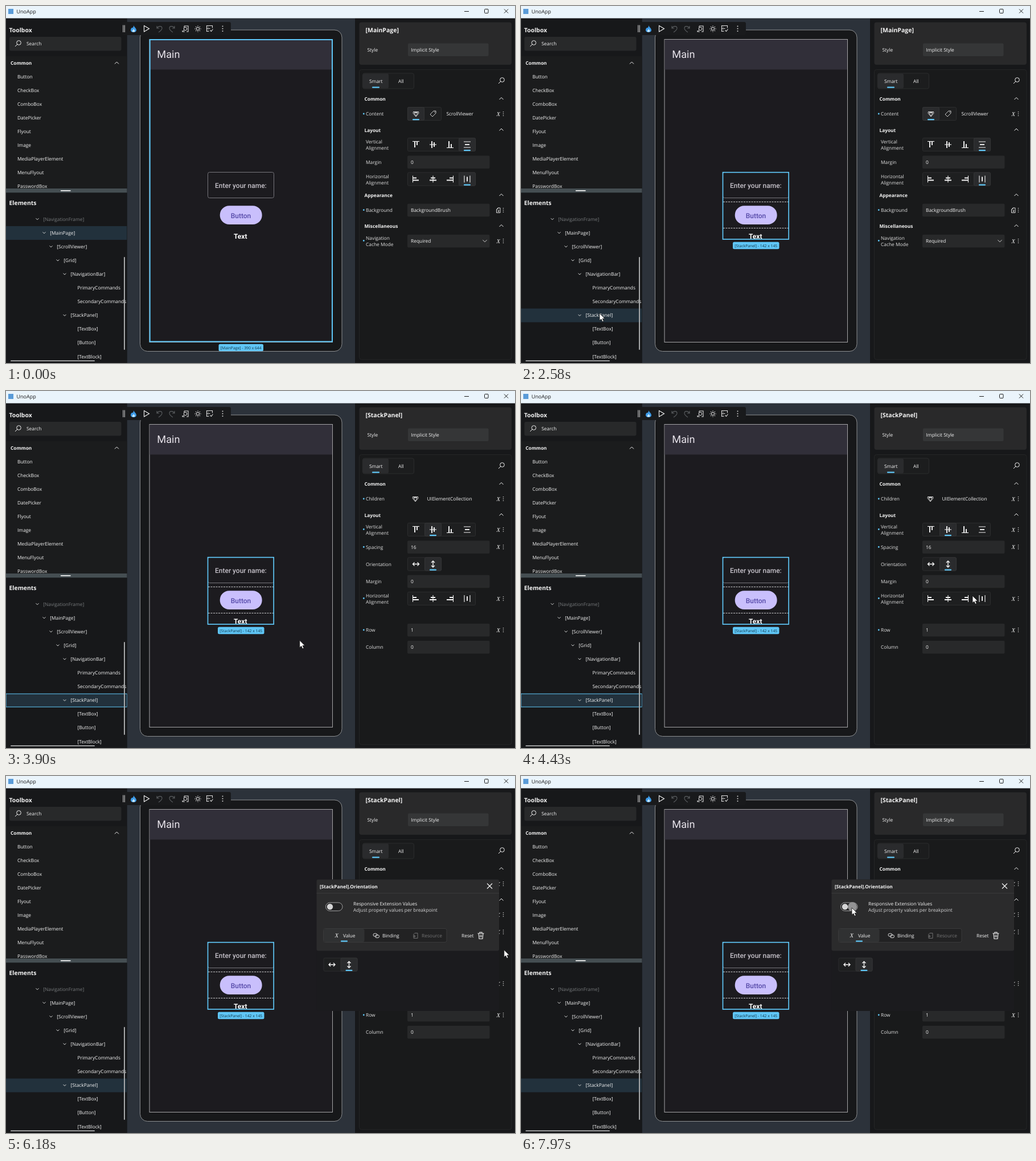
An HTML page that plays this animation: 894 px wide and 626 px high, repeating every 7.99 s.

```html
<!DOCTYPE html>
<html lang="en">
<head>
<meta charset="utf-8">
<title>UnoApp</title>
<style>
  html, body { margin: 0; width: 100%; height: 100%; overflow: hidden; background: #17181a; }
  svg { display: block; width: 894px; height: 626px; }
  text { font-family: "Open Sans", "Noto Sans", sans-serif; white-space: pre; }
  .app { font-family: Roboto, sans-serif; }
  .var { font-family: "Liberation Serif", serif; font-style: italic; }
</style>
</head>
<body>
<svg id="stage" viewBox="0 0 894 626" text-rendering="geometricPrecision"></svg>
<script>
const LOOP = 7990;
const BLUE = '#5fc6f6', INK = '#f4f4f4', FIELD = '#28292a';

// Drawing helpers, each returning markup
const rect = (x, y, w, h, fill, extra = '') =>
  `<rect x="${x}" y="${y}" width="${w}" height="${h}" fill="${fill}" ${extra}/>`;
const line = (d, color = INK, width = 1, extra = '') =>
  `<path d="${d}" fill="none" stroke="${color}" stroke-width="${width}" ${extra}/>`;
const text = (x, y, s, size = 8.4, fill = INK, extra = '') =>
  `<text x="${x}" y="${y}" font-size="${size}" fill="${fill}" ${extra}>${s}</text>`;
const bold = (x, y, s, size = 8.3) => text(x, y, s, size, INK, 'font-weight="700"');
const at = (x, y, body, extra = '') => `<g transform="translate(${x} ${y}) ${extra}">${body}</g>`;
const group = (id, body) => `<g id="${id}">${body}</g>`;
const circle = (x, y, r, fill, extra = '') =>
  `<circle cx="${x}" cy="${y}" r="${r}" fill="${fill}" ${extra}/>`;

const up = (x, y) => line(`M${x - 3.5} ${y + 2}l3.5 -3.5 3.5 3.5`);
const down = (x, y, s = 2.5) => line(`M${x - s} ${y - s / 2}l${s} ${s} ${s} ${-s}`, '#d8d8d8');
const dots = (x, y, gap = 3.3, r = .8) =>
  [-gap, 0, gap].map(d => circle(x, y + d, r, '#d4d4d4')).join('');
const loupe = (x, y) => line(`M${x - 5} ${y + 5}l4 -4`) +
  circle(x + 1.5, y - 1.5, 3.8, 'none', `stroke="${INK}"`);
const variable = (x, y) => text(x, y, 'X', 10.5, INK, 'class="var"');

// Property panel parts
const ALIGN = [
  ['M-6 -5.5H6', 'M-2 -5.5V5M2 -5.5V1'],
  ['M-6 0H6', 'M-2 -6V6M2 -4V4'],
  ['M-6 5.5H6', 'M-2 5.5V-6M2 5.5V-1'],
  ['M-6 -5H6M-6 5H6', 'M-4 0H4']
];
const alignIcon = i => line(ALIGN[i][0], INK, 1.1) + line(ALIGN[i][1], INK, 1.9);
const arrows = line('M-5 0H5M-2.5 -3L-5.5 0L-2.5 3M2.5 -3L5.5 0L2.5 3', INK, 1.4);
const gem = line('M-4.5 -3.5H4.5L5 -1L0 5L-5 -1ZM-3 -1L0 -4L3 -1L0 4ZM-4.5 -3.5L3 -1M4.5 -3.5L-3 -1', '#dcdcdc', .9);
const tag = line('M-5 1L1 -5H5V-1L-1 5Z', '#c8c8c8') + circle(3, -3, .8, '#c8c8c8');

function cells(x, cy, icons, selected) {
  const w = 30 * icons.length;
  let out = rect(x + .5, cy - 11.5, w - 1, 23, '#1e1f20', 'rx="2" stroke="#2c2d2e"');
  if (selected >= 0) {
    const sx = x + 30 * selected;
    out += rect(sx + .5, cy - 11.5, 29, 23, '#2a2b2d', 'rx="2" stroke="#343536"') +
      rect(sx + 9, cy + 9, 12, 2.2, BLUE, 'rx="1"');
  }
  return out + icons.map((icon, i) => at(x + 15 + 30 * i, cy, icon)).join('');
}
const verticalCells = (cy, sel) => cells(705, cy, [0, 1, 2, 3].map(alignIcon), sel);
const horizontalCells = (cy, sel) =>
  cells(705, cy, [0, 1, 2, 3].map(i => at(0, 0, alignIcon(i), 'rotate(-90)')), sel);
const orientationCells = (x, cy) => cells(x, cy, [arrows, at(0, 0, arrows, 'rotate(90)')], 1);

const field = (cy, s) => rect(705, cy - 11, 144.5, 22.5, FIELD, 'rx="2"') + text(711, cy + 3, s);
const section = (cy, s) => bold(629.5, cy + 3, s) + up(870, cy - 1);
function label(cy, s, custom) {
  const rows = s.split('|');
  const first = rows.length > 1 ? cy - 2 : cy + 3;
  return rows.map((r, i) => text(632, first + 11 * i, r, 8.4, '#e2e2e2')).join('') +
    (custom ? circle(628.3, rows.length > 1 ? cy - 0.5 : cy, 1.4, BLUE) : '');
}
const menu = cy => variable(861.5, cy + 3.5) + dots(873.5, cy);

const titleBar = () => rect(0, 0, 894, 21.5, '#eaf4fb') +
  rect(4, 5, 9, 9, '#5a9bd8') +
  group('caption', text(18.5, 13, 'UnoApp', 9, '#1b1b1b') +
    line('M805 9.5H813M875 5.5L882 12.5M882 5.5L875 12.5', '#1b1b1b') +
    rect(840.5, 5.5, 6.5, 7, 'none', 'stroke="#1b1b1b" rx="1"'));

function toolbox() {
  const items = ['Button', 'CheckBox', 'ComboBox', 'DatePicker', 'Flyout', 'Image',
    'MediaPlayerElement', 'MenuFlyout', 'PasswordBox'];
  return rect(0, 21.5, 212.5, 605, '#17181a') + rect(0, 88, 212.5, 232, '#1b1c1d') +
    bold(5.5, 46, 'Toolbox', 10.4) + rect(6, 54, 196.5, 24.5, '#28292a', 'rx="3"') +
    loupe(21, 66) + text(36, 69, 'Search') +
    bold(8, 102.5, 'Common') + up(194.5, 99.5) +
    items.map((s, i) => text(20, 126.5 + 24.1 * i, s)).join('') +
    rect(0, 320, 212.5, 7.5, '#454e52') + rect(96, 323, 17.5, 1.6, '#fff');
}

function tree() {
  const nodes = [[0, '[NavigationFrame]', 1], [1, '[MainPage]', 1], [2, '[ScrollViewer]', 1],
    [3, '[Grid]', 1], [4, '[NavigationBar]', 1], [5, 'PrimaryCommands'], [5, 'SecondaryCommands'],
    [4, '[StackPanel]', 1], [5, '[TextBox]'], [5, '[Button]'], [5, '[TextBlock]']];
  return rect(0, 327.5, 212.5, 299, '#17181a') + bold(5.5, 348.5, 'Elements', 10.4) +
    rect(0, 386, 212.5, 24, '#22313c', 'id="row"') +
    rect(0, 531, 212.5, 23, 'none', `id="focus" stroke="${BLUE}"`) +
    nodes.map(([depth, s, open], i) => {
      const y = 373.5 + 24.1 * i;
      return text(65.2 + 12.05 * depth, y + 3, s, 8.4, i ? INK : '#777a7c') +
        (open ? down(55 + 12 * depth, y) : '');
    }).join('') +
    rect(207, 440, 2, 163, '#a7a9aa', 'rx="1"') + rect(8, 621.5, 148, 1.6, '#c5c6c7', 'rx=".8"');
}

function toolbar() {
  const undo = line('M-4 -5V-1H0M-4 -1C-1 -6 5 -5 5 -1C5 2 2 4 -1 6', '#5a5d60', 1.1);
  const rays = [0, 45, 90, 135].map(a => at(0, 0, line('M0 -5.5V-4M0 4V5.5'), `rotate(${a})`)).join('');
  return rect(204, 28, 191, 23, '#191a1c', 'rx="3"') +
    line('M205.8 33.5V46M208.3 33.5V46', '#c9c9c9', 1.1) +
    at(224, 40, '<path d="M0 -6C1 -3 5 -1 5 2.5C5 5 2.5 6 0 6S-5 5 -5 2C-5 0 -4 -1 -3 -2C-2 -1 0 -2 0 -6Z" fill="#3d9be8"/>' +
      '<path d="M0 0C1 2 2.5 2 2.5 4C2.5 6 -2.5 6 -2.5 4C-2.5 2.5 0 2 0 0Z" fill="#c5e8ff"/>') +
    line('M242.5 34.5L251.5 39.8L242.5 45Z', INK, 1.1) + at(269, 40, undo) + at(292, 40, undo, 'scale(-1 1)') +
    at(315, 40, line('M-2 -5H5V5H2M-2 -5V-2M-5 3V5H-1', '#ddd', 1.1) +
      circle(0, 0, 2.8, 'none', 'stroke="#ddd"') + line('M-2 2L-5 5', '#ddd')) +
    at(337, 40, circle(0, 0, 2.6, 'none', `stroke="${INK}"`) + rays) +
    at(357.5, 39.5, line('M5 -1V-5H-5V0H1M-5 0V5H-1M-3 -2.5H-2M-3 2.5H-2M1 3L3 5L6 1', '#ddd', 1.1)) +
    dots(380.5, 39.7, 4.2, 1);
}

const badge = (x, y, w, s) => rect(x, y, w, 12.5, BLUE, 'rx="2.5"') +
  text(x + w / 2, y + 8.9, s, 6.8, '#123648', 'text-anchor="middle"');

function canvas() {
  const bezel = 'stroke="#8d8f91" rx="13"';
  return rect(212.5, 21.5, 401, 605, '#2c323a') + rect(235.5, 42, 354.5, 563.5, '#17181a', bezel) +
    rect(252, 58.5, 321.5, 531, '#1c1b1f', 'stroke="#a4a4a6"') + rect(252.5, 59, 320.5, 52.5, '#312f39') +
    text(265.3, 91, 'Main', 18.2, '#e7e3ea', 'class="app"') +
    rect(354.5, 291.5, 116, 45, 'none', 'rx="3" stroke="#77767c"') +
    text(367, 318.7, 'Enter your name:', 12, '#c6c2ca', 'class="app" font-weight="500"') +
    rect(375.7, 350.3, 74, 32.7, '#c9bffc', 'rx="16.3"') +
    text(412.5, 371.5, 'Button', 12, '#5549a8', 'class="app" font-weight="500" text-anchor="middle"') +
    text(411.7, 407.7, 'Text', 12, '#fff', 'class="app" font-weight="700" text-anchor="middle"') +
    group('pageMark', rect(252.7, 59, 320.3, 529.5, 'none', `stroke="${BLUE}" stroke-width="2"`) +
      badge(373.5, 592.8, 78.5, '[MainPage] - 390 x 644')) +
    group('stackMark', line('M355 343.5H470M355 389.5H470', '#c9c9cb', 1, 'stroke-dasharray="3 1.5"') +
      rect(354.5, 291.7, 115.7, 117.3, 'none', `stroke="${BLUE}" stroke-width="1.7"`) +
      badge(372, 413.7, 81.5, '[StackPanel] - 142 x 145'));
}

const pageProps = () => bold(631.5, 46, '[MainPage]', 10.5) +
  label(189, 'Content', 1) + cells(705, 189, [gem, tag], 0) + text(773.5, 192, 'ScrollViewer') + menu(189) +
  label(243, 'Vertical|Alignment') + verticalCells(243, 3) +
  label(273.5, 'Margin') + field(273.5, '0') +
  label(303.5, 'Horizontal|Alignment') + horizontalCells(303.5, 3) +
  section(332, 'Appearance') +
  label(357.7, 'Background', 1) + field(357.7, 'BackgroundBrush') +
  at(865, 358, line('M-1 -4H3V4.5H-3.5V-1ZM-3 -1L0 -4M0 -1V3M-1.5 1.5L0 3L1.5 1.5', '#ddd')) + dots(873.5, 358) +
  section(386, 'Miscellaneous') +
  label(412, 'Navigation|Cache Mode', 1) + field(412, 'Required') + down(841, 412, 3.5) + menu(412);

const stackProps = () => bold(631.5, 46, '[StackPanel]', 10.5) +
  label(189, 'Children', 1) + at(719, 189, gem) + text(739.5, 192, 'UIElementCollection') + menu(189) +
  label(243, 'Vertical|Alignment', 1) + verticalCells(243, 1) + menu(243) +
  label(273.5, 'Spacing', 1) + field(273.5, '16') + menu(273.5) +
  label(303.5, 'Orientation') + orientationCells(705, 303.5) +
  label(333.7, 'Margin') + field(333.7, '0') +
  label(364, 'Horizontal|Alignment', 1) + horizontalCells(364, -1) + menu(364) +
  label(419, 'Row', 1) + field(419, '1') + menu(419) +
  label(449, 'Column') + field(449, '0') +
  rect(865.5, 296, 16.5, 15.5, '#343536', 'id="more" rx="3"') + group('moreDots', dots(873.5, 303.5));

const properties = () => rect(613, 21.5, 281, 605, '#17181a') +
  rect(620.5, 28.5, 267.5, 74.5, '#29292a', 'rx="4"') +
  text(634.5, 80, 'Style') + rect(706, 65.5, 141.5, 22.5, '#353637', 'rx="2"') + text(711.5, 80, 'Implicit Style') +
  rect(620.5, 111.5, 267.5, 508.5, '#191a1b', 'rx="4" stroke="#252627"') +
  rect(626.5, 118, 90, 27, '#1c1d1e', 'rx="3" stroke="#2b2c2d"') + rect(627, 118.5, 45, 26, '#2a2b2d', 'rx="3"') +
  rect(643, 141.5, 13, 2.2, BLUE, 'rx="1"') +
  text(638, 135, 'Smart') + text(689, 135, 'All') + loupe(870, 131) +
  section(163, 'Common') + section(217.5, 'Layout') +
  group('pageProps', pageProps()) + group('stackProps', stackProps());

const popup = () => group('popup', rect(545.5, 181.5, 320.5, 230.5, '#1b1b1e', 'rx="3"') +
  rect(545.5, 181.5, 320.5, 125, '#2b2b2c', 'rx="3"') + line('M545.5 205.5H866', '#3a3a3b') +
  bold(551, 196.5, '[StackPanel].Orientation') +
  line('M845 188.5L854 197.5M854 188.5L845 197.5', INK, 1.2) +
  rect(561.5, 222, 29.5, 14.5, '#232324', 'rx="7.3" stroke="#a0a0a1"') +
  circle(582, 229.3, 8, '#939394', 'id="press"') + circle(569, 229.3, 5.2, '#d4d4d5') +
  text(610, 227, 'Responsive Extension Values') +
  text(610, 238.3, 'Adjust property values per breakpoint', 8.4, '#d5d5d6') +
  rect(557.5, 267.5, 216.5, 24, '#222223', 'rx="3" stroke="#3a3a3b"') +
  rect(558, 268, 71.5, 23, '#303132', 'rx="3"') +
  rect(629.5, 268, 72, 23, '#2f3031', 'id="binding"') + rect(588, 288.5, 12, 2.2, BLUE, 'rx="1"') +
  variable(577.5, 283.3) + text(592, 282.7, 'Value') +
  at(650, 279.7, rect(-5, -3.5, 7, 5, 'none', 'rx="2.5" stroke="#ddd"') +
    rect(-1.5, -1, 7, 5, 'none', 'rx="2.5" stroke="#ddd"')) + text(661, 282.7, 'Binding') +
  at(719, 280, line('M-1 -4.5H4V4.5H-3V-2.5ZM-4 1H0M-2 -1L0 1L-2 3', '#707071')) +
  text(730, 282.7, 'Resource', 8.4, '#747475') +
  text(800, 282.7, 'Reset') +
  at(834, 280, line('M-5.5 -4H5.5M-4 -4L-3 5.5H3L4 -4M-2 -4V-6H2V-4M-1.2 -1.5V3M1.2 -1.5V3', INK, 1.1)) +
  orientationCells(557.5, 330.7));

const cursor = () => '<path id="cursor" d="M0 0V12.6L2.9 10L4.9 14.6L7.2 13.6L5.2 9.2H9.2Z" fill="#fff" stroke="#111" stroke-width=".8"/>';

document.getElementById('stage').innerHTML =
  canvas() + toolbox() + `<svg width="212.5" height="626">${tree()}</svg>` +
  toolbar() + properties() + titleBar() + popup() + cursor();

const $ = id => document.getElementById(id);
const show = (id, on) => $(id).setAttribute('visibility', on ? 'visible' : 'hidden');

// Pointer moves: start, end, destination, easing
const smooth = u => u * u * (3 - 2 * u);
const out = u => 1 - (1 - u) ** 2;
const linear = u => u;
const START = [254, 622];
const MOVES = [
  [720, 1210, 149, 546, smooth],
  [1390, 1410, 147, 543, linear],
  [1410, 1740, 138, 539, smooth],
  [3430, 4230, 736, 378, smooth],
  [4320, 4430, 793, 359, out],
  [4530, 5110, 866, 302, smooth],
  [5120, 5250, 875, 305, out],
  [6170, 6770, 627, 276, smooth],
  [6770, 6880, 611, 264, out],
  [6970, 7690, 581, 231, smooth]
];
function pointer(t) {
  let [x, y] = START;
  for (const [from, to, nx, ny, ease] of MOVES) {
    if (t < from) break;
    const k = ease(Math.min(1, (t - from) / (to - from)));
    x += (nx - x) * k;
    y += (ny - y) * k;
  }
  return [x, y];
}

function render(t) {
  const [x, y] = pointer(t);
  show('cursor', t >= 720);
  $('cursor').setAttribute('transform', `translate(${x.toFixed(1)} ${y.toFixed(1)})`);

  $('row').setAttribute('y', t < 1920 ? 386 : 530.5);
  $('caption').setAttribute('opacity', t >= 1920 && t < 2330 ? .55 : 1);
  show('pageMark', t < 2560);
  show('stackMark', t >= 2560);
  show('focus', t >= 3020 && t < 4700);
  show('pageProps', t < 3020);
  show('stackProps', t >= 3020);

  const moreHover = t >= 5130 && t < 5600;
  show('more', moreHover);
  $('more').setAttribute('fill', t < 5520 ? '#343536' : '#27282a');
  show('moreDots', t >= 4330 && t < 5880 && y < 318 && x > 790);

  show('popup', t >= 5830);
  $('popup').setAttribute('opacity', t < 5880 ? .6 : 1);
  const overBinding = t >= 6180 && x > 625 && x < 701;
  $('binding').setAttribute('opacity', overBinding ? 1 : 0);
  $('press').setAttribute('opacity', t < 7950 ? 0 : t < 7970 ? .5 : 1);
}

const origin = performance.now();
function tick() {
  render((performance.now() - origin) % LOOP);
  requestAnimationFrame(tick);
}
tick();
</script>
</body>
</html>
```
